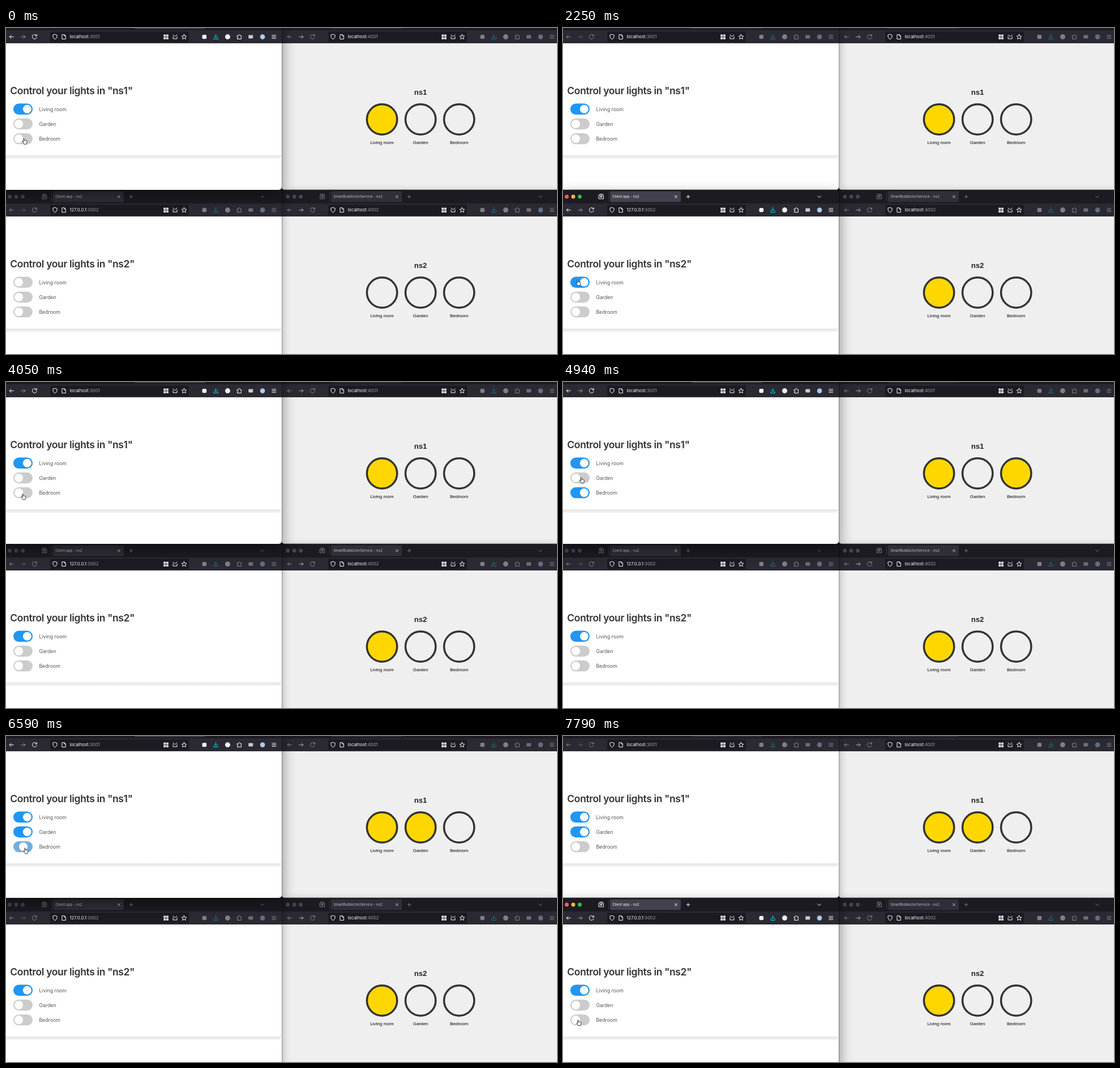
Animation, 973 px wide and 576 px high, one loop 8000 ms. Source, as an HTML page:

```html
<!DOCTYPE html>
<html lang="en">
<head>
<meta charset="utf-8">
<title>Light switches</title>
<style>
html, body { margin: 0; width: 100%; height: 100%; overflow: hidden; background: #1c1b22; }
#stage { position: absolute; left: 0; top: 0; width: 973px; height: 576px; overflow: hidden; }
.win { position: absolute; width: 491px; height: 306px; border-radius: 5px; overflow: hidden; z-index: 1;
  box-shadow: 0 0 0 .6px rgba(0,0,0,.5), 0 5px 16px rgba(0,0,0,.32); }
.win.client { z-index: 2; }
.win.client.active { z-index: 3; box-shadow: 0 0 0 .6px rgba(0,0,0,.6), 0 9px 24px rgba(0,0,0,.46); }
svg { display: block; position: absolute; left: 0; top: 0; }
text { font-family: Inter, sans-serif; }
.arial { font-family: "Liberation Sans", Arial, sans-serif; text-anchor: middle; }
.line { fill: none; stroke: #fbfbfe; stroke-width: 1; stroke-linecap: round; stroke-linejoin: round; }
.tab { fill: #42414d; }
.dot { stroke: none; }
.win:not(.active) .dim { opacity: .42; }
.win:not(.active) .tab { fill: #302f39; }
.win:not(.active) .dot { fill: #474650; }
.win:not(.active) .title { opacity: .72; }
#cursor { overflow: visible; z-index: 9; }
</style>
</head>
<body>
<div id="stage"></div>
<script>
const LOOP = 8000;
const ROOMS = ['Living room', 'Garden', 'Bedroom'];
const stage = document.getElementById('stage');

const line = (d, extra = '') => `<path class="line" d="${d}" ${extra}/>`;
const rect = (x, y, w, h, fill, r = 0) =>
  `<rect x="${x}" y="${y}" width="${w}" height="${h}" rx="${r}" fill="${fill}"/>`;
const circle = (x, y, r, fill, extra = '') =>
  `<circle cx="${x}" cy="${y}" r="${r}" fill="${fill}" ${extra}/>`;
const text = (x, y, size, fill, str, extra = '') =>
  `<text x="${x}" y="${y}" font-size="${size}" fill="${fill}" ${extra}>${str}</text>`;

function tabStrip(title, tabX) {
  const lights = ['#ff5f57', '#febc2e', '#28c840']
    .map((c, i) => circle(6.6 + i * 11.5, 12, 3.4, c, 'class="dot"')).join('');
  return rect(-4, 0, 491, 24, '#1c1b22') + lights +
    `<g class="dim">${line('M63.5 9.5h8v6.3h-8zM64.5 7.5h6M66 11.5h3v1.5h-3z')}
      ${line('M218.2 12h5.6M221 9.2v5.6')}${line('M449.8 10.8l2.8 2.8l2.8-2.8')}</g>` +
    rect(80, 4, .7, 16, '#45444e') +
    `<rect class="tab" x="${tabX}" y="2.5" width="125" height="19" rx="2"/>
    <g class="title">${text(tabX + 4.2, 14.3, 6.3, '#fbfbfe', title)}
      ${line(`M${tabX + 114.4} 10l4 4m0-4l-4 4`, 'stroke-width=".8"')}</g>`;
}

function toolbar(host, port, canForward) {
  const grid = [[0, 0], [4.7, 0], [0, 4.7], [4.7, 4.7]]
    .map(([x, y]) => rect(278.3 + x, 31.5 + y, 3.8, 3.8, '#fbfbfe', .4)).join('');
  return rect(-4, 24, 491, 23, '#2b2a33') + rect(78, 26.3, 245, 18.6, '#1c1b22', 2) +
    `<g class="dim">${line('M6.2 35.6h7.2M9.2 32.6l-3 3l3 3')}
      ${line('M54 33.6a4 4 0 1 0 .3 3M54.3 31.4v2.6h-2.6')}</g>
    <g ${canForward ? 'opacity=".6"' : 'class="dim"'}>
      ${line('M26.6 35.6h7.2M30.8 32.6l3 3l-3 3', canForward ? '' : 'opacity=".5"')}</g>` +
    line('M86.5 31.3l3.7 1.3c.1 3.8-1 5.9-3.7 7.3c-2.700-1.400-3.800-3.500-3.700-7.300z') +
    line('M99.300 31.700h3.700l2.300 2.300v5.600h-6zM103 31.700v2.300h2.300') +
    text(112.4, 38.4, 7.75, '#fbfbfe', `${host}<tspan fill="#a3a3ab">:${port}</tspan>`) + grid +
    line('M295 35v4h7v-4M295 32l3.500 3l3.500-3') +
    line('M314.500 31.200l1.300 2.900l3.100.3l-2.400 2.100l.8 3.100l-2.800-1.700l-2.800 1.700l.8-3.100l-2.400-2.100l3.100-.3z') +
    `<g class="dim">${rect(346.5, 32, 7.6, 7.2, '#f2f2f5', 2)}
      ${line('M370.500 31.500v5.200M368 34.500l2.500 2.500l2.500-2.500M366.800 37v2.500h7.400V37', 'style="stroke:#00ddff"')}
      ${circle(391.4, 35.6, 4.5, '#f2f2f5')}
      ${line('M408.500 33.500h2.200c-.5-2.900 3-2.900 2.600 0h2v6h-6.800v-1.900c2.200.2 2.200-2.300 0-2.100z')}
      ${rect(428.2, 32.6, 8, 6, '#c9cbd0', 1)}
      ${circle(453, 35.6, 4.3, '#a9cdf2')}
      ${line('M469.700 32.900h7M469.700 35.600h7M469.700 38.300h7')}</g>`;
}

function controls(ns) {
  const rows = ROOMS.map((room, i) => {
    const y = 163.3 + i * 26.15;
    return rect(13, y - 9.7, 34, 19.4, '#ccc', 9.7) +
      `<rect id="${ns}-track${i}" x="13" y="${y - 9.7}" width="34" height="19.4" rx="9.700" fill="#2196f3"/>` +
      circle(22.6, y, 7.5, '#fff', `id="${ns}-knob${i}"`) +
      text(58.4, y + 3.2, 8.75, '#555', room);
  }).join('');
  return rect(-4, 47, 491, 259, '#fff') +
    `<rect x="-4" y="238" width="490" height="13" rx="5" fill="url(#cardShade)"/>` +
    rect(-4, 47, 491, 198, '#fff') +
    text(7.3, 136.8, 17.5, '#333', `Control your lights in "${ns}"`, 'font-weight="600" letter-spacing="-.35"') + rows;
}

function bulbs(ns) {
  const row = ROOMS.map((room, i) => {
    const x = 173 + i * 68.1;
    return circle(x, 181.5, 26.7, '#ffd700', `id="${ns}-bulb${i}" stroke="#333" stroke-width="3.5"`) +
      text(x, 225.3, 8, '#000', room, 'class="arial"');
  }).join('');
  return rect(-4, 47, 491, 259, '#efefef') +
    text(241, 138.3, 13, '#222', ns, 'class="arial" font-weight="700"') + row;
}

function addWindow({ ns, client, top, title, host, port, tabX = 83 }) {
  const el = document.createElement('div');
  el.className = client ? 'win client' : 'win';
  el.style.left = (client ? -4 : 487) + 'px';
  el.style.top = top + 'px';
  el.innerHTML = `<svg width="491" height="306" viewBox="-4 0 491 306">
    <defs><linearGradient id="cardShade" x2="0" y2="1">
      <stop offset=".5" stop-color="#e3e3e3"/><stop offset="1" stop-color="#f4f4f4"/>
    </linearGradient></defs>
    ${client ? controls(ns) : bulbs(ns)}${tabStrip(title, tabX)}${toolbar(host, port, !client)}</svg>`;
  stage.append(el);
  return el;
}

const TOP = -20, BOTTOM = 286;
addWindow({ ns: 'ns1', top: TOP, title: 'SmartBulbActorService - ns1', host: 'localhost', port: 4001 });
addWindow({ ns: 'ns2', top: BOTTOM, title: 'SmartBulbActorService - ns2', host: 'localhost', port: 4002 });
const upper = addWindow({ ns: 'ns1', client: true, top: TOP, title: 'Client app - ns1', host: 'localhost', port: 3001, tabX: 227 });
const lower = addWindow({ ns: 'ns2', client: true, top: BOTTOM, title: 'Client app - ns2', host: '127.0.0.1', port: 3002 });

stage.insertAdjacentHTML('beforeend', `<svg id="cursor" width="12" height="14">
  <path id="arrow" d="M0 0v8.200l1.900-1.700l1.300 3l1.400-.6l-1.300-2.900h2.600z" fill="#000" stroke="#fff" stroke-width=".7"/>
  <path id="hand" d="M-.9.8c0-1.200 1.600-1.200 1.700 0l.4 2.700c.3-.8 1.500-.7 1.600.2c.4-.7 1.400-.5 1.500.3c.6-.4 1.200 0 1.200.8c0 1.700-.2 2.600-.9 3.700v1.300h-4.500v-1c-.9-1-1.500-2-2.400-3.100c-.5-.8.4-1.500 1.200-.8l.8.8z"
    fill="#fff" stroke="#000" stroke-width=".75" stroke-linejoin="round"/></svg>`);

// time, tip x, tip y, shape
const PATH = [
  [0, 31.5, 195.5, 'hand'], [150, 42, 330, 'arrow'], [300, 59, 404, 'arrow'], [450, 59, 404, 'arrow'],
  [600, 50, 424, 'arrow'], [750, 35, 441, 'hand'], [900, 27, 446, 'hand'], [1200, 25.5, 446, 'hand'],
  [1500, 25.5, 445.5, 'hand'], [2550, 25.5, 445.5, 'hand'], [2700, 28, 455, 'hand'],
  [2850, 32, 400, 'arrow'], [3000, 34, 290, 'arrow'], [3150, 31, 215, 'arrow'], [3300, 28, 195, 'hand'],
  [3450, 27.5, 193, 'hand'], [3750, 29, 198, 'hand'], [4050, 29.5, 198, 'hand'], [4640, 29.5, 198, 'hand'],
  [4940, 32, 169, 'hand'], [5690, 32, 169, 'hand'], [5990, 33.5, 198, 'hand'], [6740, 33.5, 198, 'hand'],
  [6890, 14, 262, 'arrow'], [7040, 3, 385, 'arrow'], [7190, 14, 480, 'arrow'],
  [7340, 26.5, 500, 'arrow'], [7490, 26.5, 500, 'arrow'], [7640, 26.5, 502, 'hand'], [LOOP, 26.5, 502, 'hand']
];
const FOCUS = [[0, upper], [1050, lower], [3600, upper], [7640, lower]];
// each switch lists the times it flips; the first room of ns1 starts lit
const FLIPS = { ns1: [[-1000], [5330], [4140, 6400]], ns2: [[1740], [], []] };
const SLIDE = 400, BULB_DELAY = 180;

const byId = id => document.getElementById(id);
const clamp = v => Math.min(1, Math.max(0, v));
const ease = p => p * p * (3 - 2 * p);

function sampleTime(t) {
  const start = t < 4790 ? 0 : 4790;
  return Math.min(7790, start + Math.floor((t - start) / 150) * 150);
}

function switchLevel(flips, t) {
  return flips.reduce((level, at, i) => {
    const p = ease(clamp((t - at) / SLIDE));
    return level + (i % 2 ? -p : p);
  }, 0);
}

function draw(t) {
  for (const ns in FLIPS) FLIPS[ns].forEach((flips, i) => {
    const level = switchLevel(flips, t);
    byId(`${ns}-track${i}`).setAttribute('opacity', level);
    byId(`${ns}-knob${i}`).setAttribute('cx', 22.6 + 14.8 * level);
    const lit = flips.filter(at => t >= at + BULB_DELAY).length % 2;
    byId(`${ns}-bulb${i}`).setAttribute('fill', lit ? '#ffd700' : '#efefef');
  });

  const focused = FOCUS.filter(([at]) => t >= at).pop()[1];
  for (const win of [upper, lower]) win.classList.toggle('active', win === focused);

  const k = PATH.findLastIndex(([at]) => t >= at);
  const [t0, x0, y0, shape] = PATH[k];
  const [t1, x1, y1] = PATH[k + 1];
  const p = (t - t0) / (t1 - t0);
  byId('cursor').style.transform = `translate(${x0 + (x1 - x0) * p}px, ${y0 + (y1 - y0) * p}px)`;
  for (const name of ['arrow', 'hand']) byId(name).style.display = name === shape ? '' : 'none';
}

const began = performance.now();
function tick() {
  draw(sampleTime((performance.now() - began) % LOOP));
  requestAnimationFrame(tick);
}
tick();
</script>
</body>
</html>
```
